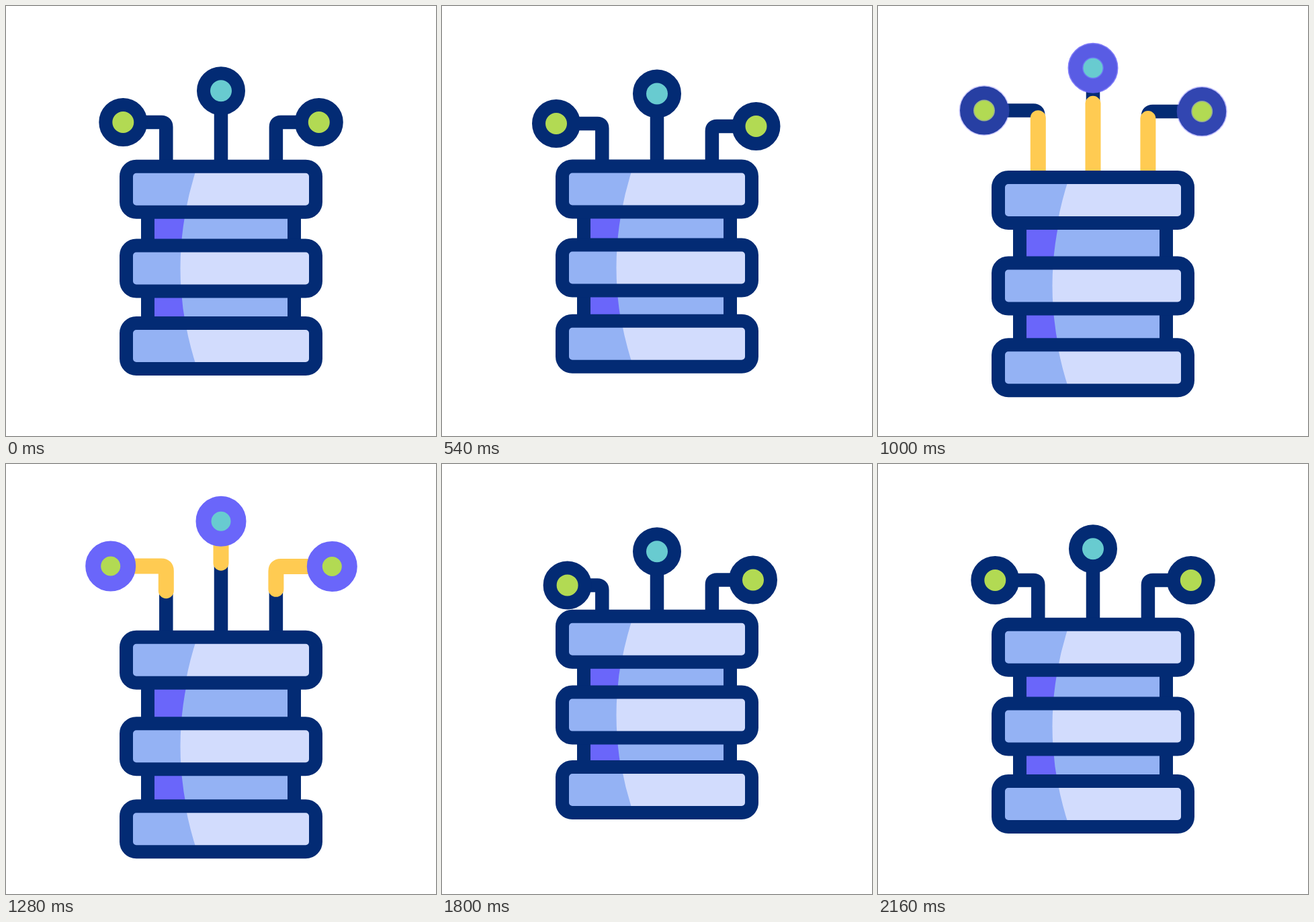
These frames come from a looping animation (640x640 px, 2.48 s). An HTML page:

```html
<!DOCTYPE html>
<html lang="en">
<head>
<meta charset="utf-8">
<title>Data stack</title>
<style>
html, body { margin: 0; width: 100%; height: 100%; overflow: hidden; background: #fff; }
svg { display: block; width: 100vw; height: 100vh; }
.wire, .beam { fill: none; stroke: #032b74; stroke-width: 20.5; }
.beam { stroke: #ffcb52; stroke-width: 23; stroke-linecap: round; }
.ring { stroke: #032b74; stroke-width: 20; }
.glow { fill: none; stroke: #6a66fa; stroke-width: 23; }
.edge { fill: none; stroke: #032b74; stroke-width: 20; }
</style>
</head>
<body>
<svg id="stage" viewBox="0 0 640 640"></svg>
<script>
const LOOP = 2480;
const stage = document.getElementById('stage');

// Key times shared by all tracks
const times = [160, 400, 540, 680, 1000, 1280, 1500, 1620, 1760, 1800, 1860, 2160];
const slabTracks = [
  [272.8, 268, 272.5, 282, 289, 291.8, 297, 307.7, 270, 260.8, 262, 272.8],
  [390.5, 381, 389.5, 405, 416.5, 420.3, 418, 404.5, 381, 373.6, 375, 390.5],
  [506, 490, 502.7, 522, 538.2, 543.3, 530, 502, 489, 485, 486.5, 506]
];
const leftX = [174.3, 174.3, 170, 164.5, 158, 155.7, 154.5, 159.2, 184, 186.6, 185.5, 174.3];
const leftY = [173, 181, 175, 166, 155.5, 152, 151, 155, 178.5, 180.4, 180, 173];
const midY = [126.3, 134.5, 130.5, 114.5, 92.2, 85.2, 82.9, 83.5, 115, 130.3, 137, 126.3];
const rightX = [465.8, 465.8, 467.5, 474.5, 482.2, 485.3, 486.5, 485.9, 470.5, 463, 455, 465.8];
const rightY = [173, 181, 179, 168, 157, 152.5, 151, 151.5, 166, 172.5, 180, 173];

// base: foot of the wire; the other fields are start times
const heads = [
  { base: 238.3, x: leftX, y: leftY, dot: '#b2da53', send: 826, leave: 1139, lit: 895, dim: 1620 },
  { base: 320, y: midY, dot: '#68cbd0', send: 781, leave: 1070, lit: 748, dim: 1560 },
  { base: 401.9, x: rightX, y: rightY, dot: '#b2da53', send: 826, leave: 1136, lit: 865, dim: 1598 }
];

function add(parent, name, attrs = {}) {
  const el = document.createElementNS('http://www.w3.org/2000/svg', name);
  for (const key in attrs) el.setAttribute(key, attrs[key]);
  return parent.appendChild(el);
}

const rect = (parent, x, y, width, height, fill) => add(parent, 'rect', { x, y, width, height, fill });
const ramp = (t, start, length) => Math.min(1, Math.max(0, (t - start) / length));

// Smooth curve through the keys that never overshoots them
function sample(track, t) {
  const last = times.length - 1;
  if (t <= times[0]) return track[0];
  if (t >= times[last]) return track[last];
  const i = times.findIndex(k => k > t) - 1;
  const rise = n => (track[n + 1] - track[n]) / (times[n + 1] - times[n]);
  const slope = n => {
    if (n === 0 || n === last) return 0;
    const a = rise(n - 1), b = rise(n);
    return a * b <= 0 ? 0 : 2 * a * b / (a + b);
  };
  const span = times[i + 1] - times[i], u = (t - times[i]) / span, v = 1 - u;
  return track[i] * v * v * (1 + 2 * u) + track[i + 1] * u * u * (3 - 2 * u)
    + span * u * v * (slope(i) * v - slope(i + 1) * u);
}

// Region left of the curved shadow line, for heights a to b around the middle slab
function shade(parent, left, a, b, fill) {
  const bend = d => 259.5 + 0.0011 * d * d;
  const mid = 259.5 + 0.0011 * a * b;
  add(parent, 'path', {
    d: `M${left} ${a}H${bend(a)}Q${mid} ${(a + b) / 2} ${bend(b)} ${b}H${left}Z`, fill
  });
}

for (const h of heads) {
  h.wire = add(stage, 'path', { class: 'wire' });
  h.beam = add(stage, 'path', { class: 'beam', pathLength: 1 });
}
for (const h of heads) {
  h.node = add(stage, 'g');
  add(h.node, 'circle', { class: 'ring', r: 26, fill: h.dot });
  h.glow = add(h.node, 'circle', { class: 'glow', r: 26 });
}

const pillar = add(stage, 'g');
rect(pillar, 211, -125, 218, 250, '#94b2f4');
shade(pillar, 211, -125, 125, '#6a66fa');
add(pillar, 'path', { class: 'edge', d: 'M211-125V125M429-125V125' });

const slabs = [-117, 0, 117].map(offset => {
  const slab = add(stage, 'g');
  rect(slab, 180, -33, 280, 66, '#d2dcfd');
  const shadow = add(slab, 'g', { transform: `translate(0 ${-offset})` });
  shade(shadow, 180, offset - 33, offset + 33, '#94b2f4');
  add(slab, 'rect', { class: 'edge', x: 179, y: -34, width: 282, height: 68, rx: 15 });
  return slab;
});

const move = (el, x, y) => el.setAttribute('transform', `translate(${x} ${y})`);

function draw(now) {
  const t = Math.floor(now % LOOP / 20) * 20;
  const ys = slabTracks.map(track => sample(track, t));
  slabs.forEach((slab, i) => move(slab, 0, ys[i]));
  move(pillar, 0, ys[1]);

  for (const h of heads) {
    const x = h.x ? sample(h.x, t) : h.base;
    const y = sample(h.y, t);
    const turn = Math.sign(x - h.base) * 7;
    const d = `M${h.base} ${ys[0]}` + (turn
      ? `V${y + 7}Q${h.base} ${y} ${h.base + turn} ${y}H${x}`
      : `V${y}`);
    h.wire.setAttribute('d', d);
    h.beam.setAttribute('d', d);

    const tip = ramp(t, h.send, 300), tail = ramp(t, h.leave, 300);
    h.beam.style.display = tip > tail ? '' : 'none';
    h.beam.setAttribute('stroke-dasharray', `${tip - tail} 3`);
    h.beam.setAttribute('stroke-dashoffset', -tail);

    move(h.node, x, y);
    h.glow.setAttribute('opacity', ramp(t, h.lit, 300) * (1 - ramp(t, h.dim, 170)));
  }
}

let start;
function tick(now) {
  start ??= now;
  draw(now - start);
  requestAnimationFrame(tick);
}
draw(0);
requestAnimationFrame(tick);
</script>
</body>
</html>
```
